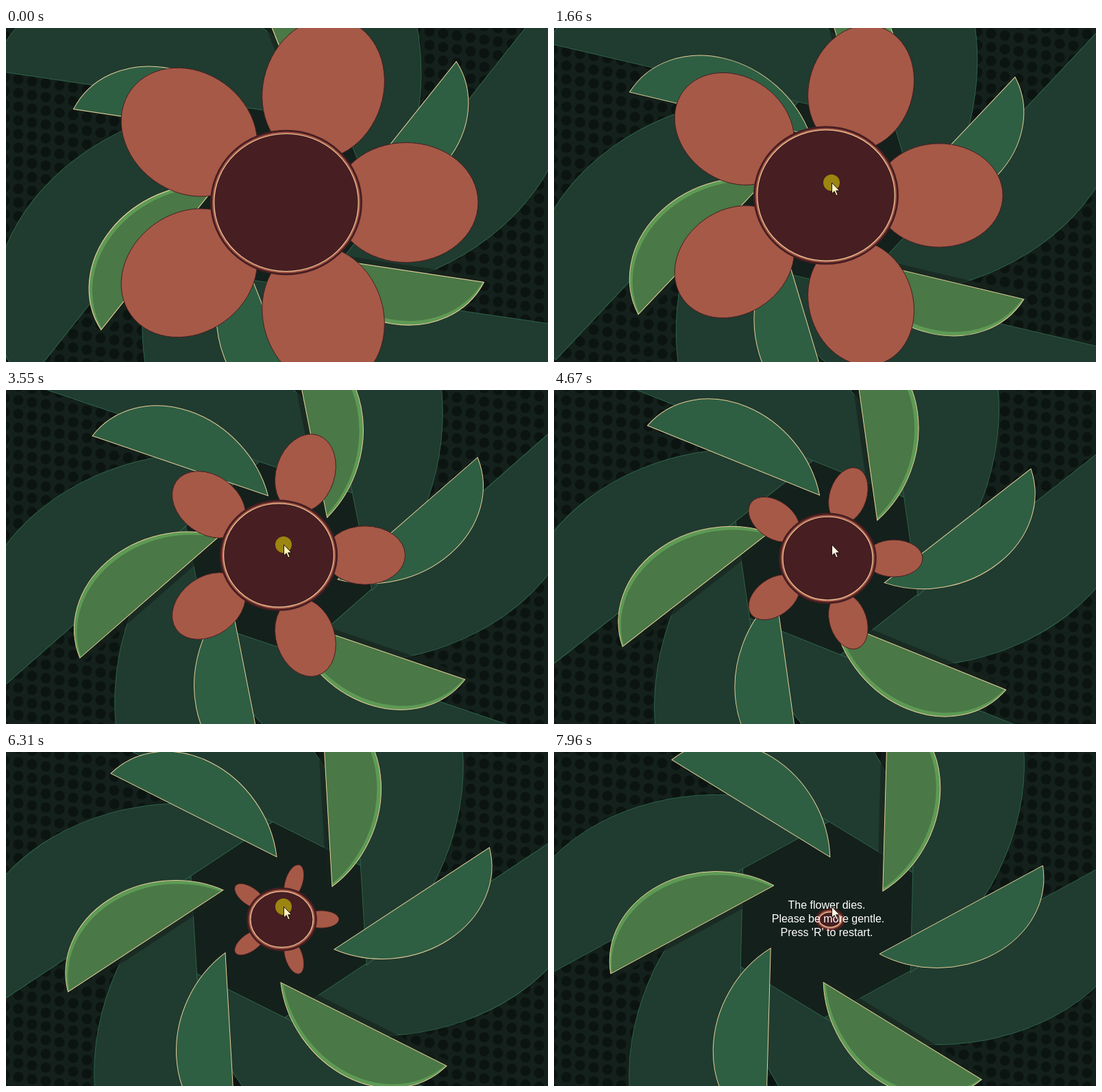
These frames come from a looping animation (791 by 488 pixels, 8000 ms). An HTML page with a canvas:

```html
<!DOCTYPE html>
<html lang="en">
<head>
<meta charset="utf-8">
<title>Flower</title>
<style>
  html, body { margin: 0; width: 791px; height: 488px; overflow: hidden; background: #14201b; }
  canvas { display: block; }
</style>
</head>
<body>
<canvas id="stage" width="791" height="488"></canvas>
<script>
const ctx = document.getElementById('stage').getContext('2d');
const LOOP = 8000, STEP = 70, TURN = Math.PI / 180;
const GROUND = '#14201b';

const blade = new Path2D('M450.6 -104.5 A300 230 0 0 1 -5.6 144.4 Z');
const leaf = new Path2D('M315.3 -79 A156 131 0 0 1 77 50 Z');
const arrow = new Path2D('M405.5 226 V242 L409.2 238.6 L411.8 244.8 L414.3 243.8 L411.7 237.8 H416.8 Z');
const inward = [-0.4787, -0.878]; // from the leaf towards its straight edge

// Time to click progress: the whole part counts clicks, the fraction is the phase of a click.
const clicks = [[0, 0], [1100, 0], [1660, 1.3], [2780, 4.3], [3550, 5.3], [4670, 8.8], [6310, 12.3], [7960, 18.8], [8000, 18.9]];
// Click count to flower centre.
const centreX = [[0, 409], [1, 397], [4, 398.5], [5, 398], [8, 399.5], [12, 402.5], [18, 403]];
const centreY = [[0, 255], [1, 244.5], [4, 245.5], [5, 241.5], [8, 246], [12, 244.5], [18, 245]];

function sample(points, x) {
  let i = 1;
  while (i < points.length - 1 && points[i][0] < x) i++;
  const [x0, y0] = points[i - 1], [x1, y1] = points[i];
  return y0 + (y1 - y0) * (x - x0) / (x1 - x0);
}

function paint(path, fill, stroke, width = 1) {
  ctx.fillStyle = fill;
  ctx.fill(path);
  if (stroke) {
    ctx.strokeStyle = stroke;
    ctx.lineWidth = width;
    ctx.stroke(path);
  }
}

function oval(x, y, rx, ry, angle = 0) {
  const path = new Path2D();
  path.ellipse(x, y, rx, ry, angle, 0, 2 * Math.PI);
  return path;
}

function shifted(path, distance, fill) {
  ctx.save();
  ctx.translate(inward[0] * distance, inward[1] * distance);
  paint(path, fill);
  ctx.restore();
}

function drawGround() {
  ctx.fillStyle = GROUND;
  ctx.fillRect(0, 0, 791, 488);
  for (let column = 0; column < 41; column++) {
    const top = (12 + column * 3) % 20 - 20;
    for (let y = top; y < 500; y += 20) paint(oval(column * 20 - 2, y, 7.5, 7.5), '#0c1411');
  }
  paint(oval(398, 245, 160, 160), GROUND);
}

function drawLeaf(light) {
  if (!light) return paint(leaf, '#2e5f43', '#e6cf9a');
  shifted(leaf, 8, 'rgba(22,34,28,0.65)');
  paint(leaf, '#5e9a55');
  ctx.save();
  ctx.clip(leaf);
  shifted(leaf, 6, '#4a7846');
  ctx.restore();
  ctx.strokeStyle = '#e6cf9a';
  ctx.stroke(leaf);
}

function drawRing(x, y, angle, drawItem) {
  for (let i = 0; i < 6; i++) {
    ctx.save();
    ctx.translate(x, y);
    ctx.rotate((angle + i * 60) * TURN);
    drawItem(i);
    ctx.restore();
  }
}

function drawFlower(n) {
  const x = sample(centreX, n), y = sample(centreY, n);
  const reach = 175 - 9.8 * n;
  const rx = 105 - 13.2 * n / (1 + 0.084 * n), ry = rx - 17.5 + 0.34 * n;
  if (ry > 0) {
    for (let i = 0; i < 5; i++) {
      const a = i * 72 * TURN;
      paint(oval(x + reach * Math.cos(a), y + reach * Math.sin(a), rx, ry, a), '#a65947', '#471e22');
    }
  }
  const w = 111 - 4.97 * n, h = w - 4.8;
  paint(oval(x, y, w - 1.5, h - 1.5), '#a65947', '#471e22', 3);
  paint(oval(x, y, w - 5.7, h - 5.7), '#471e22', '#f0c99b', 1.2);
}

function drawMessage() {
  ctx.font = '16px "Liberation Sans", Arial, sans-serif';
  ctx.textAlign = 'center';
  ctx.fillStyle = '#fff';
  ['The flower dies.', 'Please be more gentle.', "Press 'R' to restart."]
    .forEach((line, i) => ctx.fillText(line, i === 1 ? 400 : 398, 229 + i * 20));
}

function draw(t) {
  const angle = (Math.floor((t + 30) / STEP) - 114) * 0.202;
  const progress = sample(clicks, t), n = Math.floor(progress);
  const pressed = n > 0 && progress - n < 0.6;
  const drift = n === 0 ? 4.3 : 0; // the blades sit off centre until the first click

  drawGround();
  drawRing(398 + drift, 245 + drift, angle, () => paint(blade, '#203b2f', '#2d634b'));
  drawRing(398, 245, angle, i => drawLeaf(i % 2 === 1));
  drawFlower(n);
  if (n >= 18) drawMessage();
  if (pressed) paint(oval(405, 226, 12, 12), '#9c8511');
  if (t >= 1100) paint(arrow, pressed ? '#fff6b8' : '#fff6e4', '#1a1010');
}

function frame(now) {
  draw(now % LOOP);
  requestAnimationFrame(frame);
}
draw(0);
requestAnimationFrame(frame);
</script>
</body>
</html>
```
